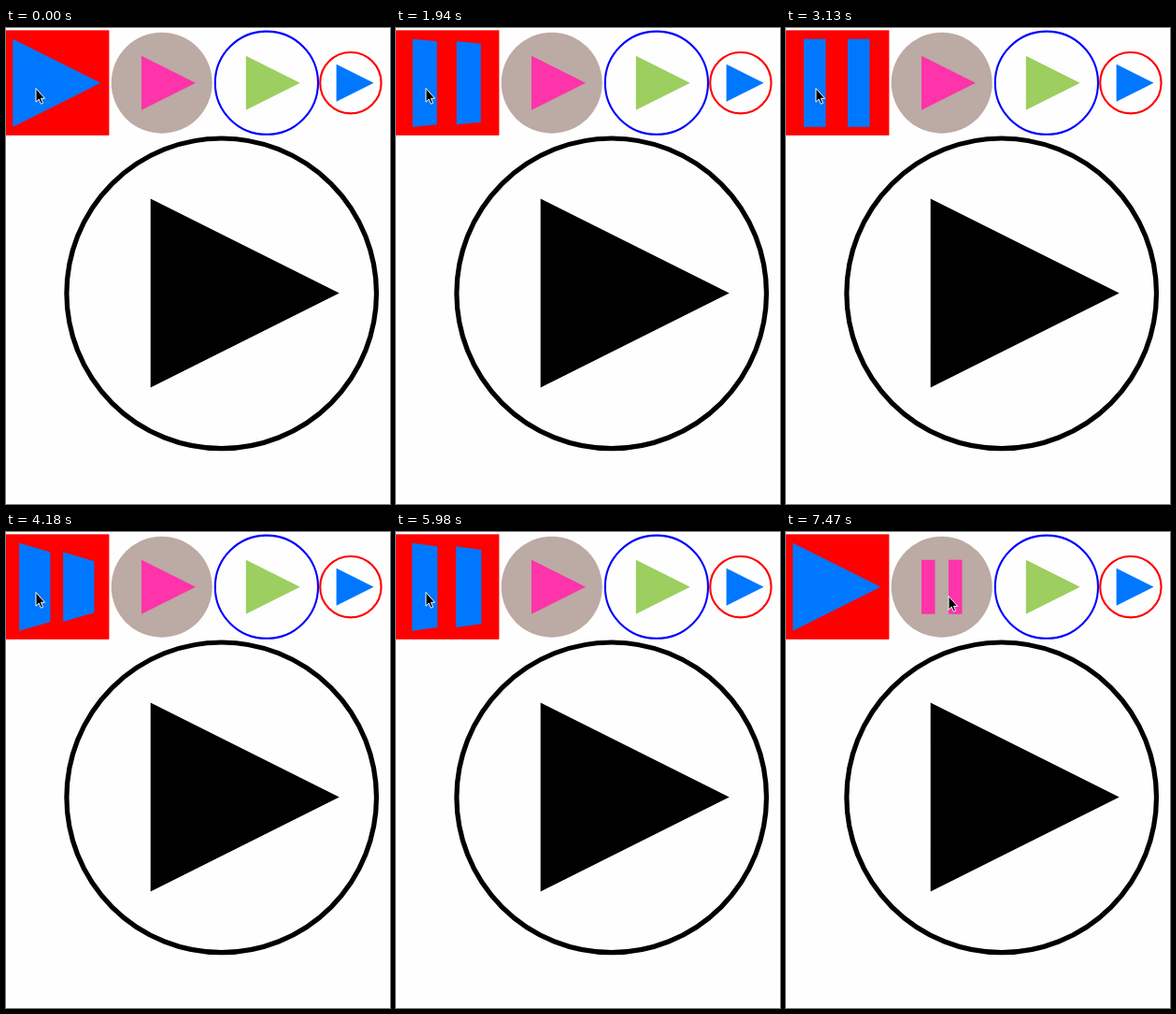
An HTML page that plays this animation: 411x509 px, repeating every 8000 ms.

```html
<!DOCTYPE html>
<html>
<head>
<meta charset="utf-8">
<style>
  html, body { margin: 0; width: 100%; height: 100%; overflow: hidden; background: #fefefe; }
  svg { display: block; }
</style>
</head>
<body>
<svg width="411" height="509" viewBox="0 0 411 509">
  <rect x="-2" y="2.4" width="112.4" height="112.4" fill="#f00"/>
  <circle cx="166.7" cy="58.7" r="54" fill="#bcaaa4"/>
  <g fill="none">
    <circle cx="278.9" cy="58.7" r="55.1" stroke="#00f" stroke-width="2.1"/>
    <circle cx="368.9" cy="58.7" r="32.7" stroke="#f00" stroke-width="2.1"/>
    <circle cx="230.7" cy="283.8" r="165.8" stroke="#000" stroke-width="5.2"/>
  </g>
  <path id="square" fill="#07f"/>
  <path id="round" fill="#f3a"/>
  <path id="ringed" fill="#9ccf60"/>
  <path id="small" fill="#07f"/>
  <path id="large"/>
  <path id="cursor" d="M2 .5V15.2L5.2 12.1 7.4 17.2 9.6 16.3 7.5 11.3H11.6Z" stroke="#fff"/>
</svg>
<script>
const LOOP = 8000;
const TICK = 149.7, TICK_OFFSET = 134;  // the picture refreshes in coarse ticks
const MORPH = 225;
const squareClicks = [320, 1885, 2883, 4076, 4851, 5916];
const roundClicks = [7137];

const $ = id => document.getElementById(id);
const setIcon = (id, ...args) => $(id).setAttribute('d', icon(...args));
const progress = (t, start, length) => Math.min(1, Math.max(0, (t - start) / length));
const smooth = u => u * u * (3 - 2 * u);
const easeOut = u => 1 - (1 - u) ** 3;

// Every click reverses the morph: 0 is play, 1 is pause.
const toggled = (clicks, t) => clicks.reduce(
  (p, click, i) => p + (-1) ** i * smooth(progress(t, click, MORPH)), 0);

// Morphs a play triangle (p = 0) into two pause bars (p = 1).
function icon(cx, cy, half, p = 0, centred = false) {
  const shift = centred ? half * p / 4 : 0;
  const slab = (x, h1, h2) => {
    const l = x + shift, r = l + half * (1 - p / 2);
    return `M${l} ${cy - h1}L${r} ${cy - h2}V${cy + h2}L${l} ${cy + h1}Z`;
  };
  const mid = half * (1 + p) / 2;
  return slab(cx - half, half, mid) + slab(cx, mid, half * p);
}

// The pointer sweeps to the second button in a shallow arc, then settles back.
function cursorAt(t) {
  const sweep = easeOut(progress(t, 6261, 440));
  const back = easeOut(progress(t, 6721, 300));
  const x = 30 + 158 * sweep - 16 * back;
  const y = 64 + 4 * sweep + 5 * Math.sin(Math.PI * sweep);
  return [x, y].map(Math.round);
}

function draw() {
  const now = (performance.now() - start) % LOOP;
  const t = TICK_OFFSET + Math.floor((now - TICK_OFFSET) / TICK) * TICK;
  setIcon('square', 54.3, 58.7, 47, toggled(squareClicks, t), true);
  setIcon('round', 174, 58.7, 29, toggled(roundClicks, t));
  $('cursor').setAttribute('transform', `translate(${cursorAt(t)})`);
  requestAnimationFrame(draw);
}

setIcon('ringed', 285.8, 58.7, 29);
setIcon('small', 373.6, 58.7, 20);
setIcon('large', 255.7, 283.5, 101);
const start = performance.now();
draw();
</script>
</body>
</html>
```
